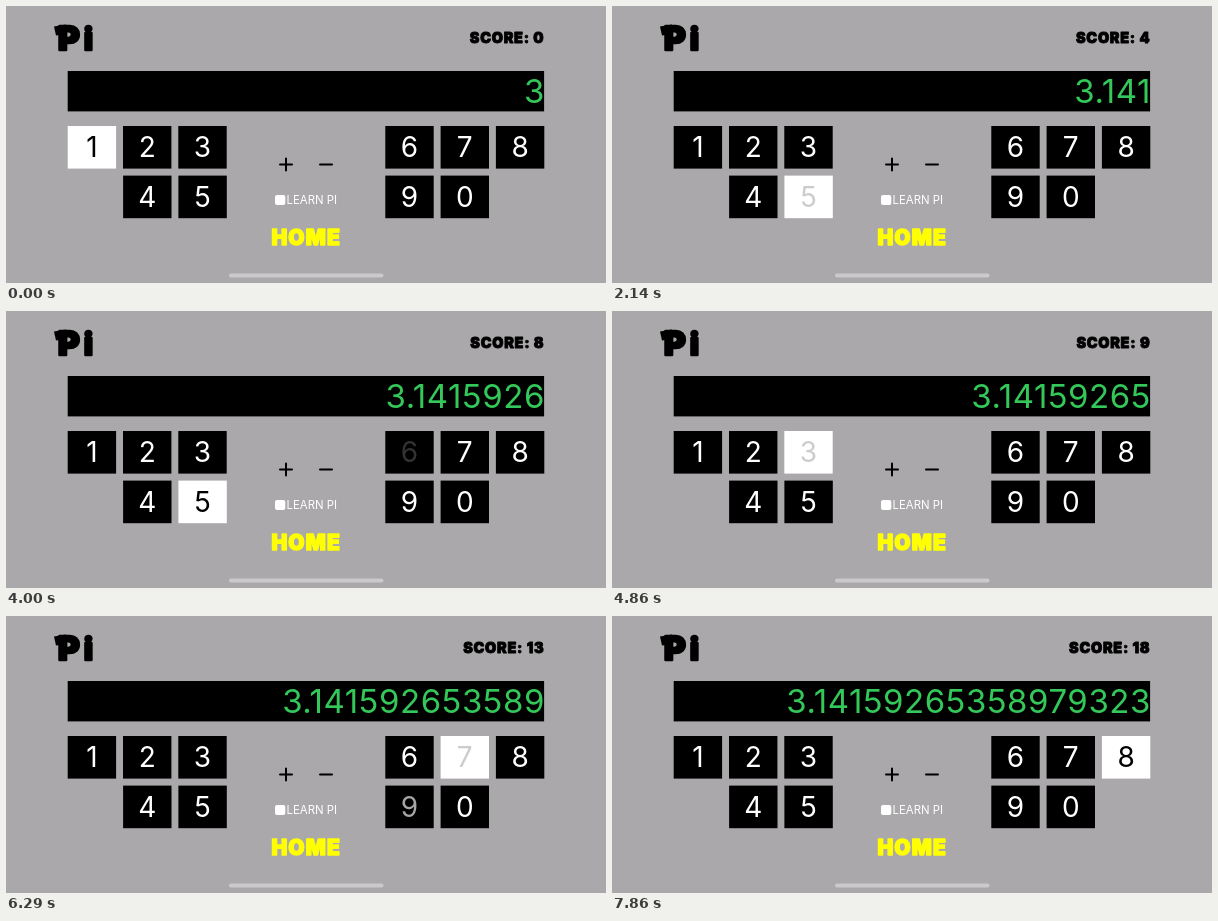
An HTML page for the animation above (8000 ms loop, 600 by 277 pixels).

```html
<!DOCTYPE html>
<html lang="en">
<head>
<meta charset="utf-8">
<title>Pi</title>
<style>
  html, body { margin: 0; width: 100%; height: 100%; overflow: hidden; background: #aaa8aa; }
  svg { display: block; width: 100vw; height: 100vh; font-family: Inter, sans-serif; }
  .chunky { font-weight: 900; stroke-linejoin: round; }
  .black { fill: #000; stroke: #000; }
  .key { font-size: 28px; text-anchor: middle; }
  #title { font-size: 33px; stroke-width: 2.6; }
  #display { font-size: 33px; letter-spacing: .57px; fill: #34c759; text-anchor: end; }
  #score { font-size: 14.5px; letter-spacing: .7px; stroke-width: .8; text-anchor: end; }
  #home { font-size: 21px; letter-spacing: 1.1px; fill: #ff0; stroke: #ff0; stroke-width: 1.4; text-anchor: middle; }
</style>
</head>
<body>
<svg viewBox="0 0 600 277">
  <path d="M48 20.500L60 18.500V28L50 29.500Z"/>
  <text id="title" class="chunky black" y="43.700"><tspan x="52">P</tspan><tspan x="78" font-size="30">i</tspan></text>
  <text id="score" class="chunky black" x="538.400" y="37"></text>

  <rect x="61.700" y="65" width="476.400" height="40.400"/>
  <text id="display" x="539" y="97.300"></text>
  <g id="keys"></g>

  <path d="M274 158.500h12M280 152.500v12M314 158.500h12" stroke="#000" stroke-width="2" stroke-linecap="round"/>
  <rect x="269" y="189" width="10.300" height="10" rx="2" fill="#fff"/>
  <text x="280.500" y="198.300" font-size="11.400" fill="#fff">LEARN PI</text>
  <text id="home" class="chunky" x="300.200" y="239">HOME</text>
  <rect x="223" y="267.500" width="154.500" height="4" rx="2" fill="#cbcacb"/>
</svg>
<script>
const LOOP = 8000;
const DIGITS = "14159265358979323846";
// Ticks (7 per second) at which each digit is touched and let go.
const TAPS = [
  [4, 5], [9, 10], [12, 13], [15, 16], [20, 20], [23, 24], [27, 28], [31, 32], [34, 35],
  [37, 38], [40, 41], [42, 43], [44, 45], [46, 47], [49, 50], [51, 52], [53, 53]
];
const FADE = [0.2, 0.65, 1];
const ROWS = [
  ["123", 61.7, 120], ["45", 117.1, 169.6],
  ["678", 379.3, 120], ["90", 379.3, 169.6]
];

const byId = id => document.getElementById(id);

function add(parent, name, attributes) {
  const node = document.createElementNS("http://www.w3.org/2000/svg", name);
  for (const key in attributes) node.setAttribute(key, attributes[key]);
  return parent.appendChild(node);
}

const keys = {};
for (const [labels, left, y] of ROWS) {
  [...labels].forEach((digit, i) => {
    const x = left + i * 55.3;
    const box = add(byId("keys"), "rect", { x, y, width: 48.4, height: 42.6 });
    const label = add(byId("keys"), "text", { x: x + 24.2, y: y + 31.3, class: "key" });
    label.textContent = digit;
    keys[digit] = { box, label };
  });
}

function draw(time) {
  const tick = Math.floor((Math.floor(time / 10) + 0.5) * 0.07);
  const count = TAPS.filter(([, up]) => up <= tick).length;
  const opacity = {};
  TAPS.forEach(([down, up], i) => {
    if (tick >= down) opacity[DIGITS[i]] = FADE[Math.min(Math.max(tick - up, 0), 2)];
  });

  byId("display").textContent = count ? "3." + DIGITS.slice(0, count) : "3";
  byId("score").textContent = "SCORE: " + (count ? count + 1 : 0);
  for (const digit in keys) {
    const { box, label } = keys[digit];
    const isNext = digit === DIGITS[count];
    box.setAttribute("fill", isNext ? "#fff" : "#000");
    label.setAttribute("fill", isNext ? "#000" : "#fff");
    label.setAttribute("fill-opacity", opacity[digit] ?? 1);
  }
}

function frame() {
  draw(performance.now() % LOOP);
  requestAnimationFrame(frame);
}
frame();
</script>
</body>
</html>
```
